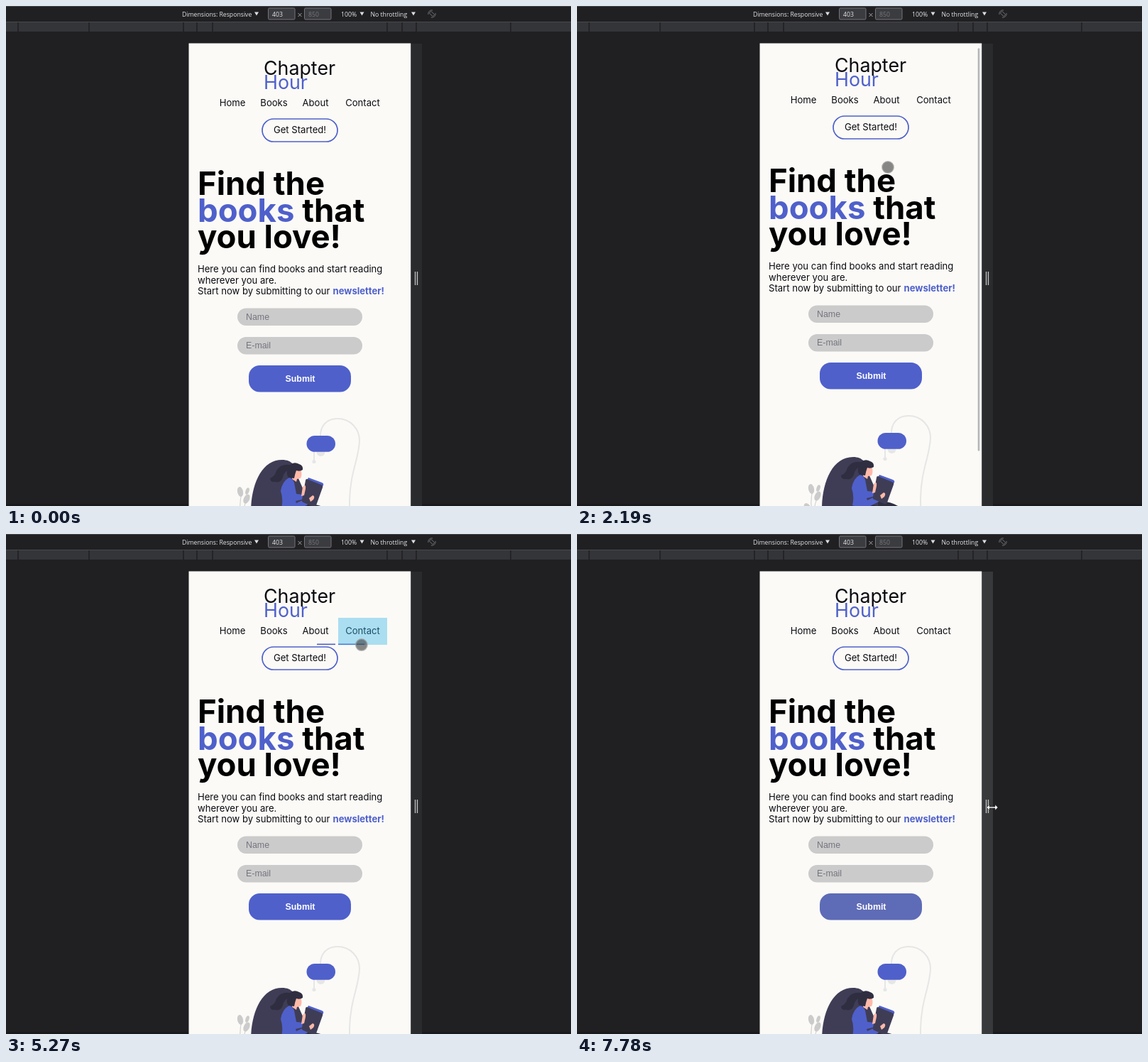
An HTML page for the animation above (8000 ms loop, 796 by 704 pixels).

```html
<!DOCTYPE html>
<html lang="en">
<head>
<meta charset="utf-8">
<title>Responsive page preview</title>
<style>
html, body { margin: 0; width: 100%; height: 100%; overflow: hidden; background: #202023; }
svg { display: block; width: 100vw; height: 100vh; }
text { font-family: Inter, sans-serif; font-size: 13.1px; fill: #0b0b10; white-space: pre; }
.tool text { font: 8.7px "Open Sans", sans-serif; fill: #e4e5e8; }
.logo text { font-size: 26.8px; }
.title text { font-size: 45.5px; font-weight: 700; fill: #000; }
.form text { font: 12.4px "Liberation Sans", Arial, sans-serif; fill: #74757f; }
.form .send { font-weight: 700; fill: #fff; }
.mid { text-anchor: middle; }
.title .blue, .logo .blue, .blue { fill: #4f60cb; }
.dark { fill: #3f3d56; }
.ink { fill: #2f2e41; }
.skin { fill: #ffb9a9; }
.pale { fill: #e6e6e6; }
.grey { fill: #cbcbcb; }
</style>
</head>
<body>
<svg viewBox="0 0 796 704" preserveAspectRatio="none">
  <defs><clipPath id="view"><rect x="257.500" y="52.500" width="312.700" height="651.500"/></clipPath></defs>
  <rect width="796" height="704" fill="#202023"/>
  <rect y="701" width="796" height="3" fill="#1a191c"/>

  <g class="tool">
    <rect width="796" height="1" fill="#47484b"/>
    <rect y="22" width="796" height="14" fill="#343538"/>
    <path d="M0 22.5H796" stroke="#48494c"/>
    <path id="ticks" stroke="#1c1c1f" stroke-width="1.3"/>
    <text x="248" y="14.5">Dimensions: Responsive</text>
    <g stroke="#74757a" fill="#3b3c40">
      <rect x="369.5" y="3" width="37.5" height="16" rx="1.5"/>
      <rect x="420.5" y="3" width="37.5" height="16" rx="1.5"/>
    </g>
    <text x="375" y="14.5">403</text>
    <text x="426" y="14.5" style="fill:#77787c">850</text>
    <path d="M411.500 10l5 5m0-5l-5 5" stroke="#a0a1a5"/>
    <text x="472" y="14.5">100%</text>
    <text x="513.500" y="14.5">No throttling</text>
    <path d="M350 8.500h6l-3 5zM498.500 8.500h6l-3 5zM571 8.500h6l-3 5z" fill="#dcdde0"/>
    <g transform="translate(600 11)" fill="none" stroke="#85868a" stroke-width=".8">
      <rect x="-1.800" y="-3.500" width="3.600" height="7" rx=".6" transform="rotate(-45)"/>
      <path d="M-5 1A5 5 0 0 1 1-5M5-1A5 5 0 0 1-1 5"/>
    </g>
  </g>
  <rect id="gutter" x="570" y="53" width="16" height="651"/>
  <path d="M576.500 374v19M579.500 374v19" stroke="#c2c3c5" stroke-width="1.3"/>

  <g clip-path="url(#view)">
    <rect x="257" y="52" width="314" height="652" fill="#fbfaf7"/>
    <g id="page">
      <g class="logo"><text x="363" y="97">Chapter</text><text x="363" y="117" class="blue">Hour</text></g>
      <g id="nav" class="mid"></g>
      <rect id="start" x="361" y="159" width="106" height="32" rx="16" stroke="#4f60cb" stroke-width="1.7"/>
      <text id="startText" class="mid" x="414" y="179.300">Get Started!</text>

      <g class="title">
        <text x="270" y="266">Find the</text>
        <text x="270" y="303.500"><tspan class="blue">books</tspan> that</text>
        <text x="270" y="341">you love!</text>
      </g>
      <text x="270" y="375">Here you can find books and start reading</text>
      <text x="270" y="390.500">wherever you are.</text>
      <text x="270" y="406">Start now by submitting to our</text>
      <text x="460.500" y="406" class="blue" font-weight="700">newsletter!</text>

      <g class="form">
        <rect class="grey" x="326" y="425.500" width="176" height="24.500" rx="12.200"/>
        <rect class="grey" x="326" y="466" width="176" height="24.500" rx="12.200"/>
        <text x="338" y="442">Name</text>
        <text x="338" y="482">E-mail</text>
        <rect id="submit" x="342" y="506" width="144" height="37.500" rx="15.500"/>
        <text class="send mid" x="414.500" y="529">Submit</text>
      </g>

      <g transform="translate(0 93)">
        <!-- lamp -->
        <path d="M443 515C442 499 451 488 467 488C486 488 498 503 498 519C497 546 485 562 484 604C484 640 489 664 497 688M434 534v12" fill="none" stroke="#e6e6e6" stroke-width="2"/>
        <circle class="pale" cx="434" cy="548.500" r="2.600"/>
        <circle class="pale" cx="443.500" cy="535" r="6"/>
        <rect class="blue" x="423.500" y="512" width="40.500" height="22.800" rx="11.400"/>
        <path class="pale" d="M468 694q0-8 8-8h44q8 0 8 8z"/>
        <!-- chair -->
        <path class="dark" d="M345 625C344 585 358 546 389 546C403 546 408 554 411 570L430 613C452 616 487 640 487 656C485 682 455 693 425 693C392 693 366 681 353 656C347 645 345 636 345 625Z"/>
        <!-- reader -->
        <path class="ink" d="M424 609C444 606 460 619 478 634L473 641C455 634 440 628 424 626ZM410 613C430 612 440 627 456 635L495 641V648C475 651 450 650 436 642C424 634 412 629 404 618Z"/>
        <path class="skin" d="M475 633l5 4-3 4-6-2zM493 641h7v7h-7z"/>
        <path class="ink" d="M476 637l12-1 3 4-16 2zM498 641q5 2 6-5l4 0q2 6 1 13h-11z"/>
        <path class="skin" d="M404 562l11-3q3 8 0 13l-5 1-1 4-6-4z"/>
        <path class="blue" d="M399 571Q404 572 406 578L409 594L419 595L420 601L408 604L409 607L428 598L433 605L413 615Q398 618 388 614Q391 602 387 590Q389 576 399 571Z"/>
        <path class="ink" d="M400 553Q406 548 413 552Q419 554 418 560Q414 563 409 561Q407 566 406 572L398 571Q395 567 396 561Q391 565 390 571Q387 579 379 577Q372 578 372 572Q379 569 381 561Q387 551 400 553Z"/>
        <path class="blue" d="M426 571l19 7q3 1 2 4l-3 4-21-9z"/>
        <path class="dark" d="M424 573l20 8q3 1 2 4l-9 25q-1 3-4 2l-14-6q-3-1-2-4l5-27q0-2 2-2z"/>
        <path class="skin" d="M418 584q5-5 4 3l-2 9-4 1zM427 600l5-4q4 1 1 6l-4 3z"/>
        <!-- table -->
        <path d="M311 693C307 666 319 649 336 649H370C387 649 392 660 391 692" fill="none" stroke="#f1f1f2" stroke-width="18"/>
        <path d="M275 693.700H553" stroke="#cccccf"/>
        <path d="M334 630Q326 612 333 590M334 627Q334 610 340 602M333 628Q330 618 325 617" fill="none" stroke="#cbcbcb"/>
        <g class="grey">
          <ellipse cx="330" cy="591" rx="4" ry="7" transform="rotate(-12 330 591)"/>
          <ellipse cx="339" cy="601" rx="4" ry="7" transform="rotate(25 339 601)"/>
          <ellipse cx="325" cy="618" rx="4.500" ry="7.500" transform="rotate(-30 325 618)"/>
          <ellipse cx="340" cy="590" rx="2.500" ry="5" transform="rotate(18 340 590)"/>
          <path d="M320 629h30q7 10-3 19h-24q-10-8-3-19zM369 628h17l-2 21h-13z"/>
        </g>
        <circle cx="385.500" cy="632" r="2.800" fill="none" stroke="#cbcbcb" stroke-width="1.200"/>
      </g>
      <rect id="flash" fill="rgba(51,181,229,.4)"/>
    </g>
    <rect id="bar" x="564.700" width="2.500" height="567" rx="1" fill="#b4b7b7"/>
  </g>

  <circle id="touch" r="8" fill="rgba(56,56,56,.6)" stroke="rgba(150,150,150,.6)" stroke-width="2"/>
  <path id="arrow" d="M0 0V14L3.300 11L5.500 16L7.700 15L5.500 10.300H10Z" fill="#fff" stroke="#111" stroke-width=".8"/>
  <path id="resize" d="M-8 0l4-4v3h8v-3l4 4-4 4v-3h-8v3z" fill="#fff" stroke="#222" stroke-width=".6"/>
</svg>
<script>
const LOOP = 8000, FADE = 500, FLASH = 190;
const $ = id => document.getElementById(id);
const set = (el, attrs) => { for (const k in attrs) el.setAttribute(k, attrs[k]); };
const clamp = v => Math.min(1, Math.max(0, v));

// the CSS "ease" curve
function ease(x) {
  let lo = 0, hi = 1;
  for (let i = 0; i < 20; i++) {
    const s = (lo + hi) / 2;
    if (.75 * s * (1 - s) + s ** 3 < x) lo = s; else hi = s;
  }
  return .3 * lo * (1 - lo) ** 2 + 3 * lo * lo * (1 - lo) + lo ** 3;
}

function track(steps, t, curve = x => x) {
  if (t <= steps[0][0]) return steps[0].slice(1);
  for (let i = 1; i < steps.length; i++) {
    const [a, ...from] = steps[i - 1], [b, ...to] = steps[i];
    if (t < b) {
      const p = curve((t - a) / (b - a));
      return from.map((v, k) => v + (to[k] - v) * p);
    }
  }
  return steps.at(-1).slice(1);
}

const fade = (t, start) => ease(clamp((t - start) / FADE));
const mix = (a, b, p) => `rgb(${a.map((v, i) => Math.round(v + (b[i] - v) * p))})`;

const PAPER = [251, 250, 247], BLUE = [79, 96, 203], SOFT = [94, 107, 182];
const scrollSteps = [[900, 0], [1450, 93], [1850, 93], [2190, 4], [2590, 0]];
const cursorSteps = [
  [70, 729, 657], [400, 600, 440], [650, 470, 275], [830, 438, 234], [900, 438, 227],
  [2640, 438, 227], [3000, 385, 180], [3350, 335, 142], [3500, 325, 141], [3900, 328, 143],
  [4300, 376, 149], [4380, 383, 150], [4720, 436, 151], [5080, 490, 152], [5270, 501, 156],
  [5600, 446, 178], [5760, 440, 182], [5900, 433, 257], [6200, 440, 410], [6500, 442, 520],
  [6820, 442, 520], [7200, 490, 470], [7590, 566, 394]
];
// time of each tap, the box it lights up, and how long it is held down first
const taps = [
  { at: 3500, box: [291, 118, 56, 38], label: "Home" },
  { at: 4300, box: [350, 118, 55, 38], label: "Books" },
  { at: 4720, box: [408, 118, 56, 38], label: "About" },
  { at: 5115, box: [468, 118, 69, 38], label: "Contact" },
  { at: 5700, box: [360, 158, 108, 34] },
  { at: 6800, box: [342, 506, 144, 37.5], hold: 230 }
];

$("ticks").setAttribute("d", [17, 117, 250, 269, 291, 537, 558, 578, 711].map(x => `M${x} 23V36`).join(""));

function add(parent, tag, attrs) {
  const el = document.createElementNS("http://www.w3.org/2000/svg", tag);
  set(el, attrs);
  return parent.appendChild(el);
}
const lines = taps.filter(tap => tap.label).map(({ label, box: [x, , w] }) => {
  add($("nav"), "text", { x: x + w / 2, y: 141.3 }).textContent = label;
  return add($("nav"), "rect", { x, y: 154.5, height: 1.6, class: "blue" });
});

function draw(now) {
  const t = now % LOOP;
  const [scroll] = track(scrollSteps, t, ease);
  set($("page"), { transform: `translate(0 ${-scroll})` });
  set($("bar"), { y: 56 + scroll * .87, opacity: t < 900 ? 0 : 1 - clamp((t - 2670) / 250) });

  lines.forEach((line, i) => {
    const [x, , w] = taps[i].box;
    const head = fade(t, taps[i].at), tail = fade(t, taps[i + 1].at);
    set(line, { x: x + w * tail, width: w * Math.max(0, head - tail) });
  });

  const filled = fade(t, taps[4].at) - fade(t, taps[5].at);
  set($("start"), { fill: mix(PAPER, BLUE, filled) });
  $("startText").style.fill = mix([11, 11, 16], [255, 255, 255], filled);
  set($("submit"), { fill: mix(BLUE, SOFT, fade(t, taps[5].at)) });

  const lit = taps.find(({ at, hold = 70 }) => t >= at - hold && t < at + FLASH);
  const [x, y, width, height] = lit ? lit.box : [0, 0, 0, 0];
  set($("flash"), { x, y, width, height });

  const [cx, cy] = track(cursorSteps, t);
  const kind = t < 70 ? "" : t >= 7650 ? "resize" : cx > 570 ? "arrow" : "touch";
  for (const id of ["touch", "arrow", "resize"]) {
    const place = id === "resize" ? "585 385" : `${cx} ${cy}`;
    set($(id), { transform: `translate(${place})`, visibility: id === kind ? "visible" : "hidden" });
  }
  set($("gutter"), { fill: kind === "resize" ? "#37393b" : "#292b2d" });
}

const began = performance.now();
(function tick() {
  draw(performance.now() - began);
  requestAnimationFrame(tick);
})();
</script>
</body>
</html>
```
